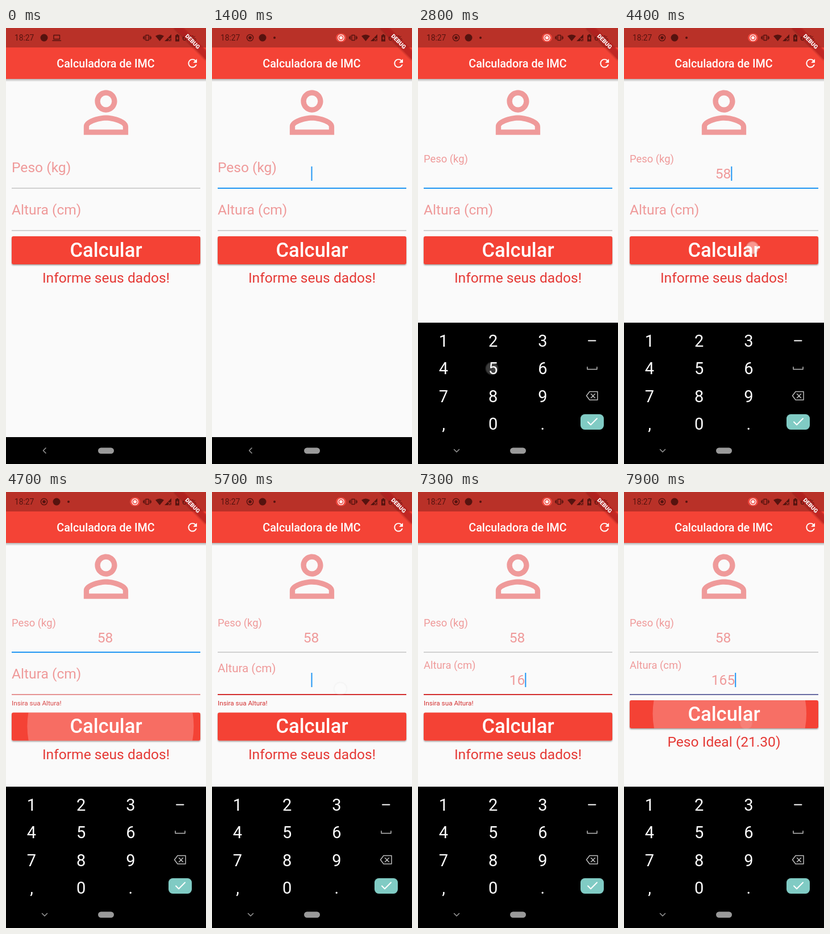
An HTML page for the animation above (8 s loop, 352x762 px).

```html
<!DOCTYPE html>
<html lang="pt-BR">
<head>
<meta charset="utf-8">
<title>Calculadora de IMC</title>
<style>
  html, body { margin: 0; width: 100%; height: 100%; overflow: hidden; background: #fafafa; }
  svg { display: block; width: 352px; height: 762px; font-family: Roboto, "Liberation Sans", sans-serif; }
  .mid { text-anchor: middle; }
  .line { fill: none; stroke-linecap: round; stroke-linejoin: round; }
  .field { font-size: 24.6px; fill: #ef9a9a; }
  .medium { font-weight: 500; fill: #fff; }
</style>
</head>
<body>
<svg viewBox="0 0 352 762">
  <defs>
    <clipPath id="keyClip"><path d="M0 500H352V715H0z"/></clipPath>
    <clipPath id="buttonClip"><rect x="10" y="364" width="332" height="49" rx="3"/></clipPath>
    <linearGradient id="shade" x2="0" y2="1">
      <stop stop-color="#000" stop-opacity=".28"/><stop offset="1" stop-color="#000" stop-opacity="0"/>
    </linearGradient>
    <radialGradient id="glow">
      <stop offset=".75" stop-color="#fff" stop-opacity=".45"/>
      <stop offset=".88" stop-color="#ccc" stop-opacity=".3"/>
      <stop offset="1" stop-color="#888" stop-opacity="0"/>
    </radialGradient>
    <filter id="drop" x="-5%" y="-20%" width="110%" height="150%">
      <feDropShadow dx="0" dy="1.6" stdDeviation="1.2" flood-opacity=".38"/>
    </filter>
  </defs>

  <rect width="352" height="762" fill="#fafafa"/>
  <rect y="89" width="352" height="5" fill="url(#shade)"/>
  <rect width="352" height="89" fill="#f44336"/>
  <rect width="352" height="34" fill="#b93128"/>
  <text class="mid medium" x="175.5" y="69" font-size="19.7">Calculadora de IMC</text>
  <path transform="translate(316.5 50) scale(.978)" fill="#fff" d="M17.65 6.35C16.2 4.9 14.21 4 12 4c-4.42 0-7.99 3.58-7.99 8s3.57 8 7.99 8c3.73 0 6.84-2.55 7.73-6h-2.08c-.82 2.33-3.04 4-5.65 4-3.31 0-6-2.69-6-6s2.69-6 6-6c1.66 0 3.14.69 4.22 1.78L13 11h7V4l-2.35 2.35z"/>

  <!-- status bar -->
  <g fill="#56130f" stroke="#56130f" stroke-width="0">
    <text x="15" y="22" font-size="13.8">18:27</text>
    <circle id="appDot" cy="17" r="6.5"/>
    <path id="laptop" class="line" stroke-width="1.4" d="M84 12.5h10.500v7H84zM82 22h14.500"/>
    <g id="recording">
      <circle class="line" cx="67" cy="17" r="5.600" stroke-width="1.500"/>
      <circle cx="67" cy="17" r="2.800"/>
      <circle cx="110" cy="17" r="2"/>
      <rect x="218" y="9.500" width="18" height="15" rx="7.500" fill="#ef4a40"/>
      <circle class="line" cx="227" cy="17" r="5.200" stroke="#fff" stroke-width="1.300"/>
      <circle cx="227" cy="17" r="2.800" fill="#fff"/>
    </g>
    <path class="line" stroke-width="1.400" d="M246 12.500h5v9h-5zM243.500 14v6M253.500 14v6M241.800 15.500v3M255.200 15.500v3"/>
    <path d="M263 14q7.500-5 15 0l-7.500 9zM291 11v12h-12z"/>
    <path class="line" stroke="#b93128" stroke-width="1.200" d="M286 18l4 4m0-4l-4 4"/>
    <path d="M298 12.500h2v-1.500h3v1.500h2v11h-7z"/>
    <path fill="#b93128" d="M302.500 14l-3 4.500h1.700v3l2.500-4.300H302z"/>
    <text x="310" y="22" font-size="13.500">67%</text>
  </g>
  <g transform="translate(352 0) rotate(45) scale(.978)">
    <rect x="-40" y="28" width="80" height="12" fill="#b71c1c" fill-opacity=".63" filter="url(#drop)"/>
    <text class="mid" y="37.700" font-size="10.200" font-weight="900" fill="#fff">DEBUG</text>
  </g>

  <path transform="translate(117.300 89) scale(4.890)" fill="#ef9a9a" fill-rule="evenodd" d="M12 5.900a2.100 2.100 0 1 1 0 4.200 2.100 2.100 0 0 1 0-4.200m0 9c2.970 0 6.100 1.460 6.100 2.100v1.100H5.900V17c0-.640 3.130-2.100 6.100-2.100M12 4C9.790 4 8 5.790 8 8s1.790 4 4 4 4-1.790 4-4-1.790-4-4-4zm0 9c-2.670 0-8 1.340-8 4v3h16v-3c0-2.660-5.330-4-8-4z"/>

  <g id="fields"></g>
  <text id="error" x="10" y="373" font-size="11.740" fill="#d32f2f">Insira sua Altura!</text>

  <g id="action">
    <rect x="10" y="364" width="332" height="49" rx="3" fill="#f44336" filter="url(#drop)"/>
    <g clip-path="url(#buttonClip)"><circle id="ripple" fill="#fff"/></g>
    <text class="mid medium" x="176" y="399.500" font-size="34.600">Calcular</text>
    <text id="info" class="mid" x="176" y="445" font-size="24.600" fill="#e53935"></text>
  </g>

  <g clip-path="url(#keyClip)">
    <g id="keyboard">
      <rect y="515" width="352" height="260"/>
      <g id="keys" class="mid" fill="#fff" font-size="29"></g>
      <g class="line" stroke="#bbb" stroke-width="1.500">
        <path d="M300 546.500h12.500" stroke="#fff" stroke-width="2"/>
        <path d="M298 592.500v4h17v-4"/>
        <path d="M302 635.500h14v14.500h-14l-5.500-7.250zM304.500 639.500l7 7m0-7l-7 7"/>
      </g>
      <rect x="286" y="675" width="41" height="27" rx="7.500" fill="#80cbc4"/>
      <path class="line" stroke="#fff" stroke-width="2" d="M299 688.500l5 5 11-11"/>
    </g>
  </g>
  <rect y="715" width="352" height="47"/>
  <path id="back" class="line" stroke="#999" stroke-width="1.500"/>
  <rect x="162" y="733.500" width="28" height="10.500" rx="5.250" fill="#999"/>

  <circle id="touch" r="12.500" fill="url(#glow)" stroke="#000" stroke-opacity=".04"/>
</svg>
<script>
const LOOP = 8000;
const FOCUS = [1400, 5620], ERROR_ON = 4550, ERROR_OFF = 7800;
const RED = [211, 47, 47], BLUE = [33, 150, 243];

// Press time, release time, x, y
const TAPS = [
  [1150, 1240, 200, 258], [2770, 2880, 130, 595], [3000, 3090, 132, 645],
  [4220, 4480, 226, 384], [5480, 5600, 226, 344], [6540, 6680, 53, 556],
  [6960, 7040, 222, 597], [7300, 7400, 134, 599], [7660, 7790, 215, 404]
];
// Start time and x of each button ripple
const RIPPLES = [[4440, 226], [7660, 220]];
// Each focus or key press restarts the blinking
const BLINKS = [1295, 2900, 3100, 5590, 6700, 7050, 7410];

const $ = id => document.getElementById(id);
const clamp = v => Math.max(0, Math.min(1, v));
const ramp = (t, start, length) => clamp((t - start) / length);
const easeOut = p => 1 - (1 - p) ** 2;
const lerp = (a, b, p) => a + (b - a) * p;
const set = (el, attrs) => { for (const k in attrs) el.setAttribute(k, attrs[k]); };
const show = (el, on) => el.setAttribute('visibility', on ? 'visible' : 'hidden');

const fields = ['Peso (kg)', 'Altura (cm)'].map((name, i) => {
  const g = document.createElementNS('http://www.w3.org/2000/svg', 'g');
  g.setAttribute('transform', `translate(0 ${i * 74})`);
  g.innerHTML = `<text class="field" x="10">${name}</text>
    <text class="field mid" x="174.5" y="263"></text>
    <rect x="10" width="332"/><rect y="242" width="2" height="25" fill="#2196f3"/>`;
  $('fields').append(g);
  const [label, value, line, cursor] = g.children;
  return { label, value, line, cursor };
});

$('keys').innerHTML = [...'123456789,0.'].map((key, i) =>
  `<text x="${45 + i % 3 * 87.2}" y="${556.5 + Math.floor(i / 3) * 48.5}">${key}</text>`).join('');

function typed(t, text, times) {
  return text.slice(0, times.filter(start => t >= start).length);
}

function drawField(i, t, text, active, lineColor, thick) {
  const { label, value, line, cursor } = fields[i];
  const p = easeOut(ramp(t, FOCUS[i], 200));
  label.style.fontSize = lerp(24.6, 18.4, p) + 'px';
  set(label, { y: lerp(252, 235, p) });
  value.textContent = text;
  set(line, { y: thick ? 279 : 279.5, height: thick ? 2 : 1, fill: lineColor });
  const start = BLINKS.filter(b => b <= t).pop();
  set(cursor, { x: 174.5 + text.length * 6.9 });
  show(cursor, active && (t - start) % 1000 < 500);
}

function draw(t) {
  const recording = t >= 500;
  show($('recording'), recording);
  show($('laptop'), !recording);
  set($('appDot'), { cx: recording ? 89 : 67 });

  const error = t >= ERROR_ON && t < ERROR_OFF;
  const second = t >= 5590;
  const pesoFocused = t > 1400 && !second;
  drawField(0, t, typed(t, '58', [2900, 3100]), t >= 1295 && !second,
    pesoFocused ? '#2196f3' : '#aaa', pesoFocused);
  const mix = ramp(t, ERROR_OFF, 170);
  const alturaColor = `rgb(${RED.map((c, k) => Math.round(lerp(c, BLUE[k], mix)))})`;
  drawField(1, t, typed(t, '165', [6700, 7050, 7410]), second,
    t >= ERROR_ON ? alturaColor : '#aaa', second);

  show($('error'), error);
  $('error').style.opacity = ramp(t, ERROR_ON, 170);
  set($('action'), { transform: `translate(0 ${error ? 21.5 : 0})` });
  $('info').textContent = t >= ERROR_OFF ? 'Peso Ideal (21.30)' : 'Informe seus dados!';

  const ripple = RIPPLES.find(([start]) => t >= start && t < start + 500);
  show($('ripple'), ripple);
  if (ripple) {
    const p = ramp(t, ripple[0], 310);
    set($('ripple'), { cx: lerp(ripple[1], 176, p), cy: lerp(384, 388.5, p), r: 174 * p,
      opacity: .24 * (1 - ramp(t, ripple[0] + 250, 220)) });
  }

  const up = easeOut(ramp(t, 1500, 300));
  show($('keyboard'), up > 0);
  set($('keyboard'), { transform: `translate(0 ${200 * (1 - up)})` });
  set($('back'), { d: up > 0 ? 'M63.5 736.5l4.500 4.500 4.500-4.500' : 'M70 734l-4.500 4.500 4.500 4.500' });

  const tap = TAPS.find(([down, release]) => t >= down && t < release + 150);
  show($('touch'), tap);
  if (tap) {
    const [down, release, cx, cy] = tap;
    set($('touch'), { cx, cy, opacity: ramp(t, down, 60) * (1 - ramp(t, release, 150)) });
  }
}

const begin = performance.now();
function tick() {
  draw((performance.now() - begin) % LOOP);
  requestAnimationFrame(tick);
}
tick();
</script>
</body>
</html>
```
